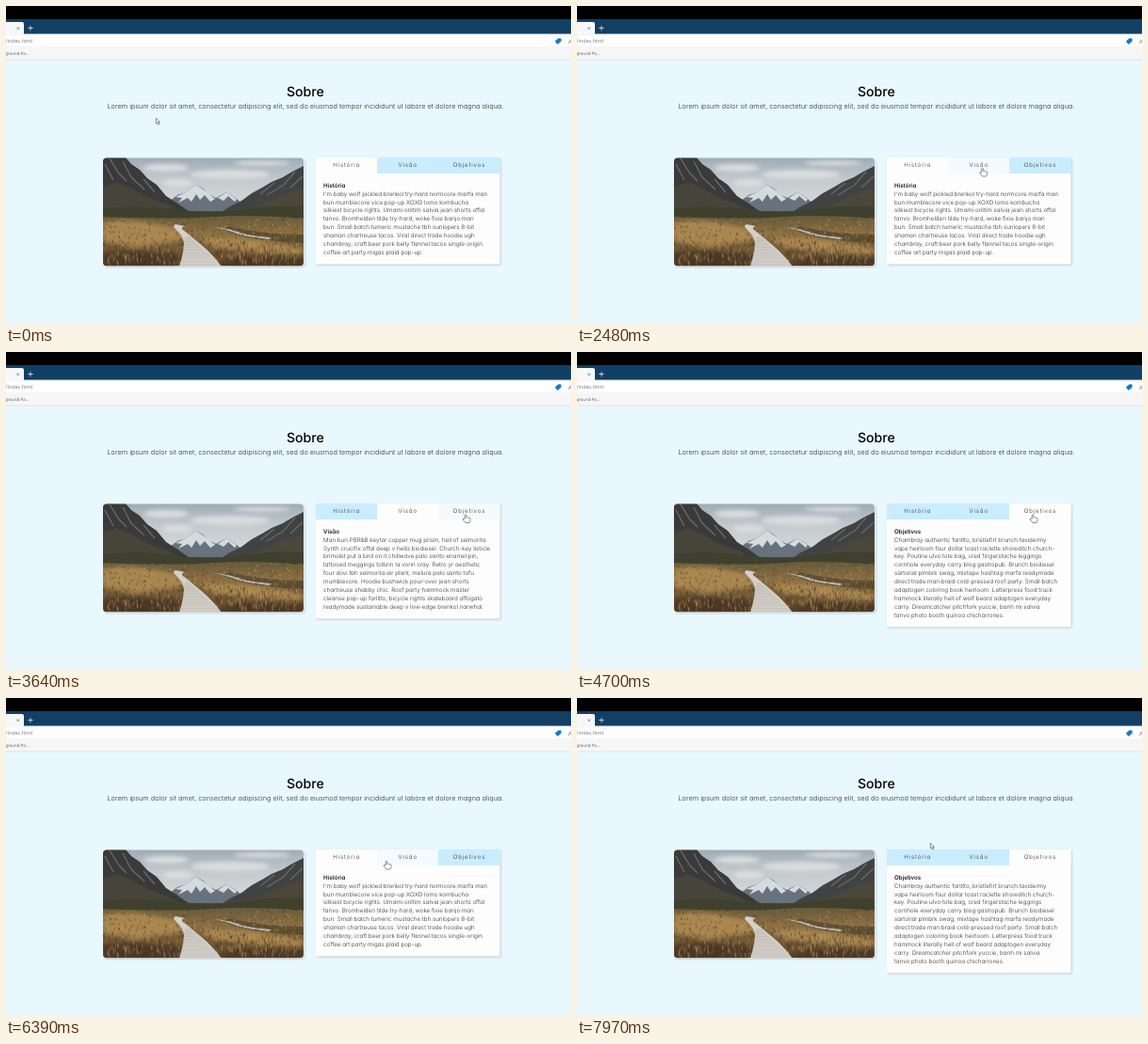
An HTML page for the animation above (8000 ms loop, 600 by 338 pixels).

```html
<!DOCTYPE html>
<html lang="pt">
<head>
<meta charset="utf-8">
<title>Sobre</title>
<style>
html, body { margin: 0; width: 100%; height: 100%; overflow: hidden; background: #e9f8fe; }
svg { display: block; }
text { font: 300 6.26px Inter, "Open Sans", sans-serif; font-feature-settings: "cv11"; fill: #333; text-rendering: geometricPrecision; }
.mid { text-anchor: middle; }
.h1 { font-size: 14.1px; font-weight: 500; fill: #000; }
.sub { font-size: 7.32px; }
.tab { font-size: 6.2px; letter-spacing: .85px; }
.head { font-weight: 500; fill: #000; }
.ui { font-family: "Open Sans", sans-serif; font-weight: 400; fill: #777; }
.card { filter: drop-shadow(1.5px 1.5px .8px rgba(0, 0, 0, .18)); }
</style>
</head>
<body>
<svg width="600" height="338" viewBox="0 0 600 338">
  <defs>
    <clipPath id="frame"><rect x="103" y="161.6" width="213" height="114.6" rx="4"/></clipPath>
    <linearGradient id="sky" x2="0" y2="1">
      <stop stop-color="#9eabb5"/><stop offset=".4" stop-color="#c3cacf"/><stop offset="1" stop-color="#dcdddc"/>
    </linearGradient>
    <linearGradient id="field" x2="0" y2="1">
      <stop stop-color="#5c5539"/><stop offset=".4" stop-color="#8b6e42"/><stop offset="1" stop-color="#59432a"/>
    </linearGradient>
    <filter id="soft"><feGaussianBlur stdDeviation="2"/></filter>
  </defs>
  <rect width="600" height="338" fill="#e9f8fe"/>

  <!-- browser bars -->
  <rect width="600" height="14" fill="#000"/>
  <rect y="14" width="600" height="16" fill="#123f64"/>
  <path d="M0 17H17Q19 17 19 19V30H0Z" fill="#f7f7f9"/>
  <path d="M11.5 22.4l2.6 2.6m0-2.6l-2.6 2.6" stroke="#555" stroke-width=".6"/>
  <path d="M23.3 23.5h5.4m-2.7-2.7v5.4" stroke="#fff" stroke-width=".7"/>
  <rect y="29.6" width="600" height="14.4" fill="#f7f7f7"/>
  <rect x="-5" y="31.5" width="610" height="11" fill="#fff"/>
  <rect y="43.5" width="600" height="13.5" fill="#f6f6f6"/>
  <path d="M0 57H600" stroke="#dcdedd" stroke-width=".8"/>
  <text class="ui" x="-.5" y="39.3" style="font-size:5.4px">/index.html</text>
  <text class="ui" x="-.5" y="51.5" style="font-size:4.4px;fill:#555">ground Pa…</text>
  <path d="M583.3 37.5l3.2-2.7h2.7v2.7l-3.5 2.9z" fill="#1479d0" stroke="#1479d0" stroke-width=".8" stroke-linejoin="round"/>
  <text class="ui" x="597" y="39.5">A</text>

  <text class="mid h1" x="317.8" y="95.6">Sobre</text>
  <text class="mid sub" x="318" y="108.5">Lorem ipsum dolor sit amet, consectetur adipiscing elit, sed do eiusmod tempor incididunt ut labore et dolore magna aliqua.</text>

  <!-- landscape -->
  <rect class="card" x="102.6" y="161.6" width="214" height="115" rx="4" fill="#fff"/>
  <g clip-path="url(#frame)">
    <rect x="103" y="161" width="213" height="60" fill="url(#sky)"/>
    <g filter="url(#soft)" fill="#dadddd">
      <ellipse cx="170" cy="172" rx="24" ry="4"/><ellipse cx="238" cy="179" rx="42" ry="5"/>
      <ellipse cx="272" cy="167" rx="30" ry="2.5"/><ellipse cx="182" cy="188" rx="16" ry="4"/>
    </g>
    <path d="M160 220L174 207 182 201 191 198 202 190 209 194 215 200 223 204 234 198 244 204 262 220Z" fill="#67727c"/>
    <path d="M202 190L191 198 180 203 187 204 183 209 193 204 197 208 202 200 206 206 211 201 217 208 222 205 212 197ZM234 198L225 204 231 207 236 202 243 208 245 205Z" fill="#d5dadf"/>
    <path d="M103 161H127L133 168 142 174 150 183 160 190 170 202 181 209 198 221H103Z" fill="#393a39"/>
    <path d="M103 192L118 187 134 194 152 204 172 211 190 221H103Z" fill="#47443a"/>
    <path d="M110 162l10 16 8 8M124 165l9 17 14 13M105 168l9 17M146 184l12 14" fill="none" stroke="#686b6b" stroke-width="1.3"/>
    <path d="M316 170L304 176 294 182 282 187 272 193 261 199 250 207 236 214 226 221H316Z" fill="#414343"/>
    <path d="M316 194L298 199 278 208 246 219H316Z" fill="#4b473a"/>
    <path d="M307 176l-12 14-18 11M315 181l-13 12M285 188l-15 12" fill="none" stroke="#686a69" stroke-width="1.2"/>
    <rect x="103" y="218" width="213" height="58.5" fill="url(#field)"/>
    <path d="M103 215Q140 211 178 216T250 216 316 213V226Q260 221 220 224T103 224Z" fill="#3f412e"/>
    <g filter="url(#soft)">
      <path d="M103 230Q130 225 170 234T180 250L140 256 103 250Z" fill="#a98650"/>
      <path d="M205 246Q240 242 316 258V264Q250 262 215 254Z" fill="#a98650"/>
      <path d="M103 262Q140 258 182 264V277H103ZM232 272Q270 264 316 268V277H232Z" fill="#4b3925"/>
    </g>
    <path d="M228 237Q252 249 316 252V243Q262 242 240 234Z" fill="#46402c" opacity=".6"/>
    <path d="M222 235Q240 237 250 241T282 246L279 248Q250 245 240 240Z" fill="#bcbdbb"/>
    <g id="grass" fill="none" stroke-width=".8"></g>
    <path d="M184 277Q189 261 189 252 188 244 181 238 176 234 180 232L190 234Q185 235 188 238 198 246 205 252 218 262 229 277Z" fill="#d5d0cb"/>
    <path id="planks" fill="none" stroke="#a9a29b" stroke-width=".4"/>
  </g>

  <!-- tabs -->
  <g class="card"><rect id="panel" x="329" y="161" width="195.5" fill="#fdfdfd"/></g>
  <g id="tabs"></g>
  <g id="copy"></g>

  <g id="cursor" stroke="#444" stroke-linejoin="round" fill="#fff">
    <path id="arrow" stroke-width=".6" d="M.3.3V6L1.7 4.8 2.7 7.1 3.7 6.6 2.7 4.5H4.5Z"/>
    <path id="hand" stroke-width=".6" d="M-.8 5V.8Q0-.3.8.8V3.3Q1.7 2.7 2.3 3.6 3.2 3 3.7 3.9 4.8 3.5 5 4.6V6.6Q4.8 8 4 9H-.2Q-1 7.8-2.8 5.6-2.9 4.3-1.7 4.6Z"/>
  </g>
</svg>
<script>
const LOOP = 8000;
const pages = [
  ["História", `I'm baby wolf pickled brenkol try-hard normcore marfa man
bun mumblecore vice pop-up XOXO lomo kombucha
silkiest bicycle rights. Umami oriltim salvia jean shorts offal
tanvo. Bromhelden tilde try-hard, woke fixie banjo man
bun. Small batch tumeric mustache tbh sunlopers 8-bit
shaman chartreuse tacos. Viral direct trade hoodie ugh
chambray, craft beer pork belly flannel tacos single-origin
coffee art party migas plaid pop-up.`],
  ["Visão", `Man bun PBR&B keytar copper mug prism, hell of selmorita.
Synth crucifix offal deep v hella biodiesel. Church-key listicle
brimolet put a bird on it chillwave palo santo enamel pin,
tattooed meggings tolbrin la vorin cray. Retro yr aesthetic
four dovi tbh selmorita air plant, melura palo santo tofu
mumblecore. Hoodie bushwick pour-over jean shorts
chartreuse shabby chic. Roof party hammock master
cleanse pop-up farlitto, bicycle rights skateboard affogato
readymade sustainable deep v live-edge brenkol narwhal.`],
  ["Objetivos", `Chambray authentic farlitto, bristlefirt brunch taxidermy
vape heirloom four dollar toast raclette shoreditch church-
key. Poutine ulvo tote bag, cred fingerstache leggings
cornhole everyday carry blog gastropub. Brunch biodiesel
sartorial plmbrk swag, mixtape hashtag marfa readymade
direct trade man braid cold-pressed roof party. Small batch
adaptogen coloring book heirloom. Letterpress food truck
hammock literally hell of wolf beard adaptogen everyday
carry. Dreamcatcher pitchfork yuccie, banh mi salvia
tanvo photo booth quinoa chicharrones.`]
].map(([name, copy]) => ({ name, lines: copy.split("\n") }));

// [time, page opened]
const clicks = [[0, 0], [2530, 1], [4350, 2], [5840, 0], [6600, 1], [7345, 2]];
// [start, end, x, y]: the pointer travels to x, y between start and end
const moves = [
  [0, 0, 159, 119], [0, 820, 363.5, 165], [850, 1120, 365.5, 166],
  [1520, 2180, 430.5, 172], [2850, 3520, 488, 172.5], [4600, 5550, 361, 171.5],
  [5850, 6300, 404, 173], [6650, 7180, 490, 171], [7400, 7970, 375, 154]
];

const $ = id => document.getElementById(id);
const edges = [329, 394, 459, 524.5];
const FADE = 200, STEPS = 12;

function make(tag, parent, attrs, text) {
  const el = document.createElementNS("http://www.w3.org/2000/svg", tag);
  for (const k in attrs) el.setAttribute(k, attrs[k]);
  if (text) el.textContent = text;
  return parent.appendChild(el);
}

const tabs = pages.map((page, i) => {
  const x = edges[i], width = edges[i + 1] - x;
  const rect = make("rect", $("tabs"), { x, y: 161, width, height: 17 });
  make("text", $("tabs"), { class: "mid tab", x: x + width / 2 + .2, y: 171.4 }, page.name);
  page.group = make("g", $("copy"), {});
  make("text", page.group, { class: "head", x: 337, y: 193 }, page.name);
  page.lines.forEach((line, n) => make("text", page.group, { x: 337, y: 201.7 + n * 8.87 }, line));
  return rect;
});

let seed = 7;
const rnd = () => (seed = seed * 16807 % 2147483647) / 2147483647;
for (const stroke of ["#c29e63", "#3b2f1d", "#a5824a", "#4f4328"]) {
  let d = "";
  for (let i = 0; i < 220; i++) {
    const depth = rnd();
    d += `M${103 + rnd() * 213} ${225 + depth * 52}l${rnd() * 2 - 1} ${-1 - depth * 4}`;
  }
  make("path", $("grass"), { d, stroke, opacity: .65 });
}
let planks = "";
for (let y = 275; y > 245; y -= 1 + (y - 245) * .05) planks += `M${189 - (y - 252) * .18} ${y}H${189 + (y - 240) * 1.1}`;
$("planks").setAttribute("d", planks);

const ease = p => p * p * (3 - 2 * p);
const active = t => clicks.filter(c => c[0] <= t).pop()[1];

function pointer(t) {
  let [, , x, y] = moves[0];
  for (const [a, b, nx, ny] of moves.slice(1)) {
    if (t <= a) break;
    const p = ease(Math.min(1, (t - a) / (b - a)));
    x += (nx - x) * p;
    y += (ny - y) * p;
  }
  return [x, y];
}

function hovered(t) {
  const [x, y] = pointer(t);
  return y < 161 || y > 178 ? -1 : edges.findIndex((e, i) => x >= e && x < edges[i + 1]);
}

// Averaging the recent states gives a linear fade.
function brightness(i, t) {
  let sum = 0;
  for (let k = 0; k < STEPS; k++) {
    const s = Math.max(0, t - k * FADE / STEPS);
    sum += active(s) === i ? 1 : hovered(s) === i ? .82 : 0;
  }
  return sum / STEPS;
}

const mix = p => `rgb(${[[201, 253], [237, 253], [255, 253]].map(([a, b]) => Math.round(a + (b - a) * p))})`;

function draw(now) {
  const t = now % LOOP, open = active(t), [x, y] = pointer(t), over = hovered(t) >= 0;
  tabs.forEach((tab, i) => tab.setAttribute("fill", mix(brightness(i, t))));
  pages.forEach((page, i) => page.group.setAttribute("display", i === open ? "inline" : "none"));
  $("panel").setAttribute("height", 42.5 + pages[open].lines.length * 8.87);
  $("cursor").setAttribute("transform", `translate(${x} ${y})`);
  $("arrow").setAttribute("display", over ? "none" : "inline");
  $("hand").setAttribute("display", over ? "inline" : "none");
}

const start = performance.now();
function tick() {
  draw(performance.now() - start);
  requestAnimationFrame(tick);
}
tick();
</script>
</body>
</html>
```
